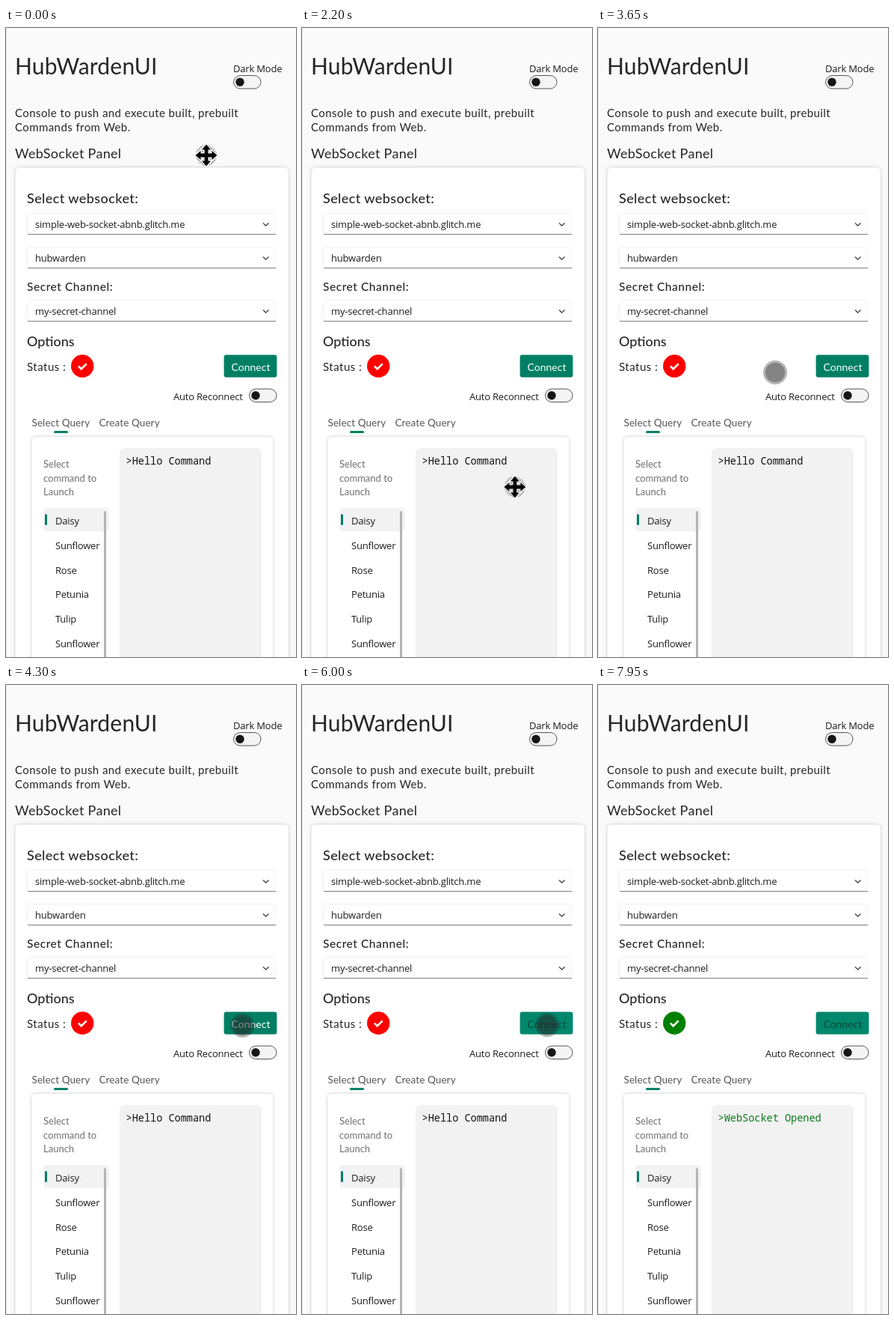
An HTML page for the animation above (8000 ms loop, 388 by 840 pixels).

```html
<!DOCTYPE html>
<html lang="en">
<head>
<meta charset="utf-8">
<title>WebSocket console</title>
<style>
html, body { margin: 0; width: 100%; height: 100%; overflow: hidden; background: #fafafa; }
svg { display: block; width: 388px; height: 840px; }
text { white-space: pre; }

.round { font-family: Lato, sans-serif; fill: #262626; }
.ui { font: 13px "Open Sans", sans-serif; letter-spacing: -.2px; fill: #1c1c1c; }
.mono { font: 13.55px "Noto Sans Mono", monospace; fill: #111; }
.title { font-size: 30px; letter-spacing: .2px; }
.intro { font-size: 15px; letter-spacing: .42px; }
.panel { font-size: 18px; letter-spacing: .3px; }
.head { font-size: 18px; font-weight: 500; }
.wide { letter-spacing: .42px; }
.label { font-size: 15.5px; font-weight: 500; letter-spacing: .55px; }
.status { font-size: 15px; letter-spacing: .5px; }
.tab { font-size: 13.5px; letter-spacing: .1px; fill: #555; }
.hint { font-size: 13px; fill: #707070; }
.connect { font-size: 14px; text-anchor: middle; }
.card { fill: #fff; filter: drop-shadow(0 0 2px rgba(0, 0, 0, .22)); }
.accent { fill: #007f66; }
.gray { fill: #f2f2f2; }

/* Hard switches share the 8 s loop */
.cursor, .button, .button text, .badge, .before, .after, .move, .touch {
  animation: 8s step-end infinite;
}
.cursor { animation-name: travel; animation-timing-function: ease-in-out; }
.button { animation-name: button; }
.button text { animation-name: caption; }
.badge { animation-name: badge; }
.before { animation-name: before; }
.after { animation-name: after; }
.move { animation-name: move; }
.touch { animation-name: touch; }

@keyframes travel {
  0%, 1.25% { transform: translate(268px, 170px); }
  11.25%, 22.5% { transform: translate(334px, 753px); }
  32.5% { transform: translate(236px, 474px); }
  35% { transform: translate(236px, 471px); }
  40%, 46.25% { transform: translate(237px, 460px); }
  56.25%, 100% { transform: translate(328px, 454px); }
}
@keyframes button { 0% { fill: #007f64; } 68.75%, 100% { fill: #00876c; } }
@keyframes caption { 0% { fill: #fff; } 68.75%, 100% { fill: #0d453a; } }
@keyframes badge { 0% { fill: #f00; } 82.5%, 100% { fill: #008000; } }
@keyframes before { 0% { opacity: 1; } 82.5%, 100% { opacity: 0; } }
@keyframes after { 0% { opacity: 0; } 82.5%, 100% { opacity: 1; } }
@keyframes move { 0% { opacity: 1; } 41.25%, 100% { opacity: 0; } }
@keyframes touch { 0% { opacity: 0; } 41.25% { opacity: 1; } 78.75%, 100% { opacity: 0; } }
</style>
</head>
<body>
<svg viewBox="0 0 388 840">
  <defs>
    <g id="field">
      <rect x="28.5" y=".5" width="332" height="29" rx="3" fill="#fff" stroke="#f1f1f1"/>
      <path d="M29 28.5H361" stroke="#858585"/>
      <path d="M344 13.5l3.7 3.7 3.7-3.7" fill="none" stroke="#333" stroke-width="1.2"/>
    </g>
    <g id="toggle">
      <rect x=".5" y=".5" width="36.5" height="17.5" rx="8.8" fill="#f4f4f4" stroke="#555"/>
      <circle cx="9" cy="9.2" r="5.7" fill="#161616"/>
    </g>
    <pattern id="checker" width="4" height="4" patternUnits="userSpaceOnUse">
      <path d="M0 0H2V4H4V2H0Z" fill="#999"/>
    </pattern>
    <path id="arm" d="M-2.4 0V-7.5H-6L0-14.5 6-7.5H2.4V0Z"/>
    <g id="arms">
      <use href="#arm"/>
      <use href="#arm" transform="rotate(90)"/>
      <use href="#arm" transform="rotate(180)"/>
      <use href="#arm" transform="rotate(270)"/>
    </g>
  </defs>

  <rect width="388" height="840" fill="#fafafa"/>
  <path d="M.5 0V840" stroke="#e6e6e6"/>

  <text class="round title" x="12" y="62">HubWardenUI</text>
  <text class="ui" x="304" y="59">Dark Mode</text>
  <use href="#toggle" x="304" y="63"/>
  <text class="round intro" x="12" y="119">Console to push and execute built, prebuilt</text>
  <text class="round intro" x="12" y="138">Commands from Web.</text>
  <text class="round panel" x="12" y="174">WebSocket Panel</text>

  <rect class="card" x="12.5" y="186.5" width="365.5" height="680" rx="5"/>
  <text class="round head wide" x="28" y="234">Select websocket:</text>
  <use href="#field" y="247"/>
  <text class="ui" x="39" y="267">simple-web-socket-abnb.glitch.me</text>
  <use href="#field" y="292"/>
  <text class="ui" x="39" y="312">hubwarden</text>
  <text class="round label" x="28" y="351">Secret Channel:</text>
  <use href="#field" y="363"/>
  <text class="ui" x="39" y="383">my-secret-channel</text>

  <text class="round head" x="28" y="425">Options</text>
  <text class="round status" x="28" y="458">Status :</text>
  <circle class="badge" cx="102.2" cy="451.5" r="15.2"/>
  <path d="M97 451.7l3.7 3.7 7-7" fill="none" stroke="#fff" stroke-width="2.6"/>
  <g class="button">
    <rect x="291.6" y="436.6" width="70.8" height="29.8" rx="3"/>
    <text class="round connect" x="327.5" y="457.5">Connect</text>
  </g>
  <text class="ui" x="224" y="497">Auto Reconnect</text>
  <use href="#toggle" x="325" y="481.5"/>

  <text class="round tab" x="34.5" y="532">Select Query</text>
  <text class="round tab" x="124.5" y="532">Create Query</text>
  <rect class="accent" x="64" y="538" width="19" height="3" rx="1.5"/>

  <rect class="card" x="34.5" y="546" width="322.5" height="320" rx="5"/>
  <text class="round hint" x="50" y="587">Select</text>
  <text class="round hint" x="50" y="605.5">command to</text>
  <text class="round hint" x="50" y="624">Launch</text>

  <rect class="gray" x="50" y="641" width="88" height="31" rx="4"/>
  <rect class="accent" x="52" y="649" width="3" height="15" rx="1.5"/>
  <rect x="131" y="645" width="3" height="220" rx="1.5" fill="#b3b3b3"/>
  <g class="ui">
    <text x="66" y="663">Daisy</text>
    <text x="66" y="696">Sunflower</text>
    <text x="66" y="729">Rose</text>
    <text x="66" y="761">Petunia</text>
    <text x="66" y="794">Tulip</text>
    <text x="66" y="827">Sunflower</text>
  </g>

  <rect class="gray" x="152" y="561" width="190" height="300" rx="6"/>
  <text class="mono before" x="160.5" y="583">&gt;Hello Command</text>
  <g class="after"><text class="mono" x="160.5" y="583" style="fill:#0b7a1b">&gt;WebSocket Opened</text></g>

  <g class="cursor">
    <g class="move">
      <circle r="14" fill="url(#checker)"/>
      <use href="#arms" stroke="#fff" stroke-width="2"/>
      <use href="#arms"/>
    </g>
    <g class="touch" fill="#282828" fill-opacity=".35">
      <circle r="16"/>
      <circle r="13"/>
    </g>
  </g>
</svg>
</body>
</html>
```
